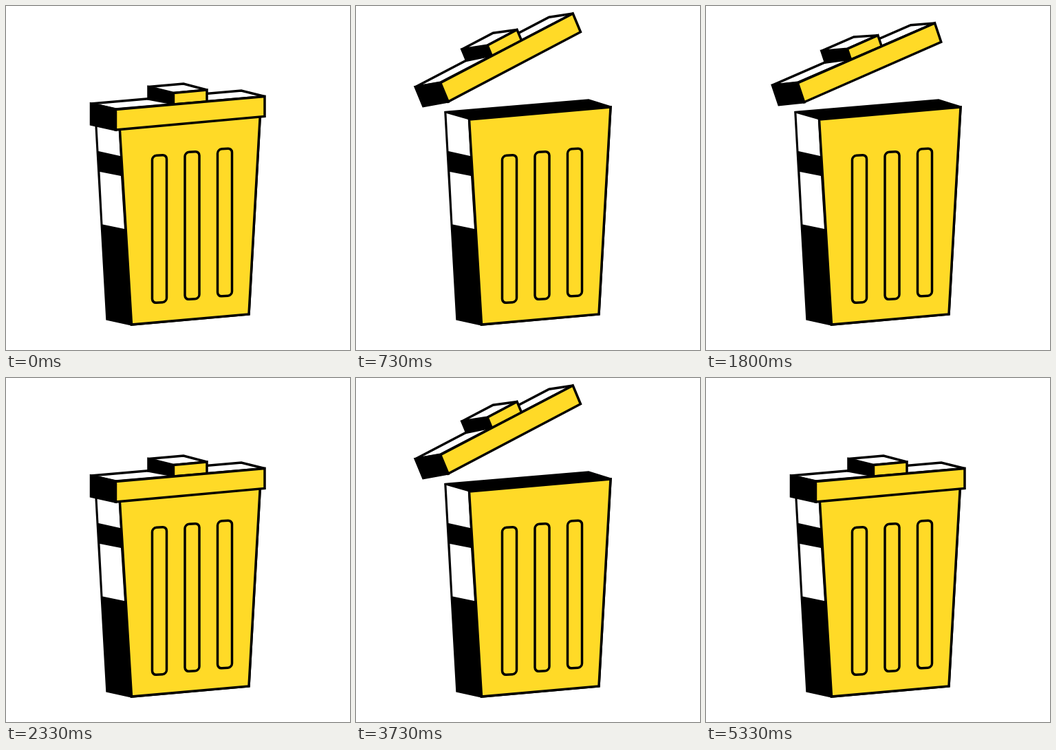
An HTML page for the animation above (6000 ms loop, 500x500 px).

```html
<!DOCTYPE html>
<html lang="en">
<head>
<meta charset="utf-8">
<title>Bin with a lifting lid</title>
<style>
  html, body { margin: 0; width: 100%; height: 100%; overflow: hidden; background: #fff; }
  svg { display: block; width: 100%; height: 100%; }
  .y { fill: #ffda27; }
  .w { fill: #fff; }
</style>
</head>
<body>
<svg viewBox="0 0 500 500" stroke="#000" stroke-width="3.500">
  <defs>
    <rect id="slot" class="y" x="-10.5" y="-107" width="21" height="214" rx="6" transform="skewY(-4)"/>
  </defs>
  <g id="bin">
    <path d="M130 154.500 338 137 370 147 353 448 183 463 147 455Z"/>
    <path class="w" stroke="none" d="M131.500 156 163 165 166 218 134.500 211Z M136.500 241 167 247 172 324 140.500 317.500Z"/>
    <path class="y" d="M164.500 165 370 147 353 448 182.500 463Z"/>
    <use href="#slot" x="223" y="324"/>
    <use href="#slot" x="270.500" y="319"/>
    <use href="#slot" x="318" y="314.500"/>
  </g>
  <g id="lid">
    <path class="w" d="M123.500 142 342 123 376 131.500 159.500 150Z"/>
    <path d="M123.500 142 159.500 150.500 159.500 180 123.500 172Z"/>
    <path d="M207 117.500 243.500 126.500 243.500 142 207 135Z"/>
    <path class="w" d="M207 117.500 258 113 292 122 243.500 126.500Z"/>
    <path class="y" d="M243.500 126.500 292 122 292 139 243.500 143Z"/>
    <path class="y" d="M159.500 150.500 376 131.500 376 160.500 159.500 180Z"/>
  </g>
</svg>
<script>
const lid = document.getElementById("lid");
const CX = 268.5, CY = 140.5; // lid centre when closed
const OPEN = 8, CLOSE = 15, LOOP = 30; // in steps of 100 ms

const smooth = u => u * u * (3 - 2 * u);
const clamp = u => Math.min(1, Math.max(0, u));

function draw(ms) {
  // ten poses a second, shown on a 15 Hz clock
  const tick = Math.floor((ms % 6000 + 4) * 3 / 200);
  const step = Math.floor(tick * 2 / 3) % LOOP;
  const p = smooth(step < CLOSE ? clamp(step / OPEN) : 1 - clamp((step - CLOSE) / OPEN));

  // the lid rises first, then swings left
  const x = -51.2 * p;
  const y = -80 * (1 - (1 - p) ** 2.1);
  const angle = -22.85 * (1 - (1 - p) ** 1.45);
  lid.setAttribute("transform", `translate(${x} ${y}) rotate(${angle} ${CX} ${CY})`);
}

const start = performance.now();
function frame() {
  draw(performance.now() - start);
  requestAnimationFrame(frame);
}
frame();
</script>
</body>
</html>
```
